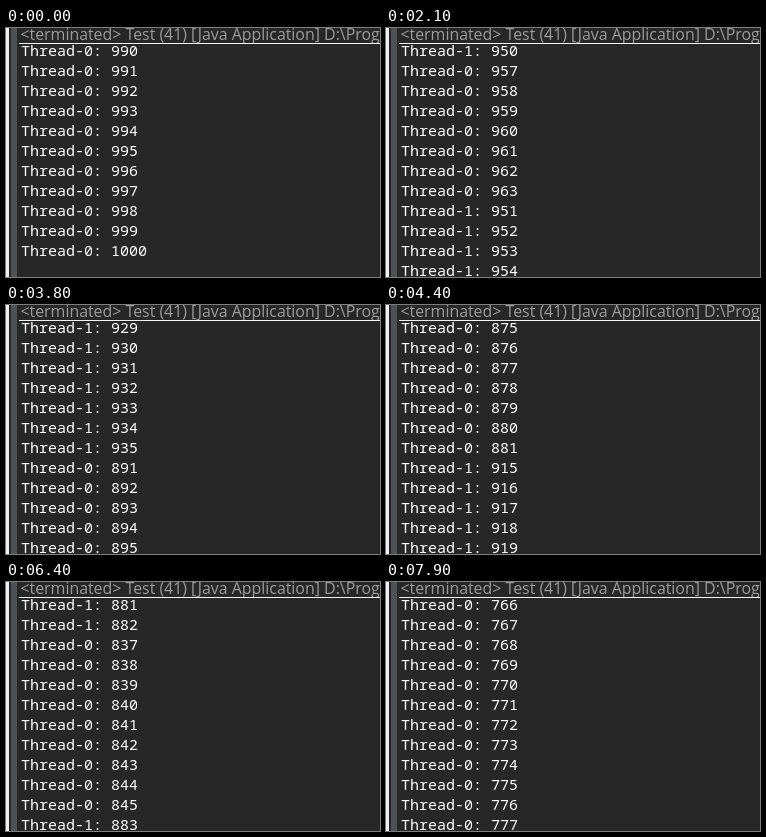
An HTML page with a canvas for the animation above (8000 ms loop, 374 by 249 pixels).

```html
<!DOCTYPE html>
<html lang="en">
<head>
<meta charset="utf-8">
<title>Console scroll</title>
<style>
html, body { margin: 0; width: 100%; height: 100%; overflow: hidden; background: #272727; }
canvas { display: block; }
</style>
</head>
<body>
<canvas id="stage" width="374" height="249"></canvas>
<script>
const ctx = document.getElementById('stage').getContext('2d');
const TICK = 100, TICKS = 80, ROWS = 12, ROW_H = 20, NOTCH = 3;

// Key views from the top of the log down: tick at which each is reached, the
// counters of both threads at its top, and its alternating run lengths.
const views = [
  { at: 79, count: [766, 856], runs: [12] },
  { at: 70, count: [823, 865], runs: [0, 6, 5, 1] },
  { at: 58, count: [855, 905], runs: [7, 3, 2] },
  { at: 38, count: [891, 929], runs: [0, 7, 5] },
  { at: 27, count: [938, 939], runs: [12] },
  { at: 15, count: [971, 975], runs: [0, 9, 3] },
  { at: 0, count: [990, 1001], runs: [11] }
];

const lines = [];
const next = [...views[0].count];

function emit(thread, length) {
  while (length-- > 0) lines.push(`Thread-${thread}: ${next[thread]++}`);
}

views.forEach((view, i) => {
  view.top = lines.length;
  view.runs.forEach((length, k) => emit(k % 2, length));
  const below = views[i + 1];
  if (!below) return;
  // Both threads take turns until they reach the counters of the next view.
  for (let turns = 3; turns > 0; turns--) {
    for (const thread of [0, 1]) {
      emit(thread, Math.round((below.count[thread] - next[thread]) / turns));
    }
  }
});

// Wheel strokes as [first, last] tick; later ones follow a steady rhythm.
const strokes = [[7, 7], [12, 13], [15, 15], [17, 24], [27, 27], [29, 32],
  [34, 35], [38, 39], [41, 41], [43, 44]];
for (let t = 53.8; t < TICKS; t += 3.25) strokes.push([Math.floor(t), Math.floor(t) + 1]);

// Number of scroll steps after one tick, up to and including another.
function steps(after, upTo) {
  return strokes.reduce((sum, [first, last]) =>
    sum + Math.max(0, Math.min(last, upTo) - Math.max(first, after + 1) + 1), 0);
}

function topLine(tick) {
  const i = views.findIndex(view => tick >= view.at);
  const from = views[i];
  if (i === 0) return from.top;
  const to = views[i - 1];
  const left = steps(tick, to.at) / steps(from.at, to.at);
  return to.top + NOTCH * Math.round((from.top - to.top) * left / NOTCH);
}

function rect(color, x, y, w, h) {
  ctx.fillStyle = color;
  ctx.fillRect(x, y, w, h);
}

function drawFrame() {
  rect('#272727', 0, 0, 374, 249);
  rect('#f0f0f0', 0, 0, 3, 249);
  rect('#4b5357', 5, 0, 6, 249);
  ctx.font = '15.9px "Open Sans", "Noto Sans", sans-serif';
  ctx.fillStyle = '#9c9c9c';
  ctx.fillText('<terminated> Test (41) [Java Application] D:\\Prog', 14.5, 12);
  rect('#f2f5f2', 13, 15, 361, 1);
}

function drawLines(top) {
  ctx.save();
  ctx.beginPath();
  ctx.rect(11, 17, 363, 232);
  ctx.clip();
  ctx.font = '15px "Noto Sans Mono", "DejaVu Sans Mono", monospace';
  ctx.fillStyle = '#ffffff';
  lines.slice(top, top + ROWS).forEach((text, i) => ctx.fillText(text, 15, 28 + i * ROW_H));
  ctx.restore();
}

function draw() {
  drawFrame();
  drawLines(topLine(Math.floor(performance.now() / TICK) % TICKS));
  requestAnimationFrame(draw);
}
draw();
</script>
</body>
</html>
```
